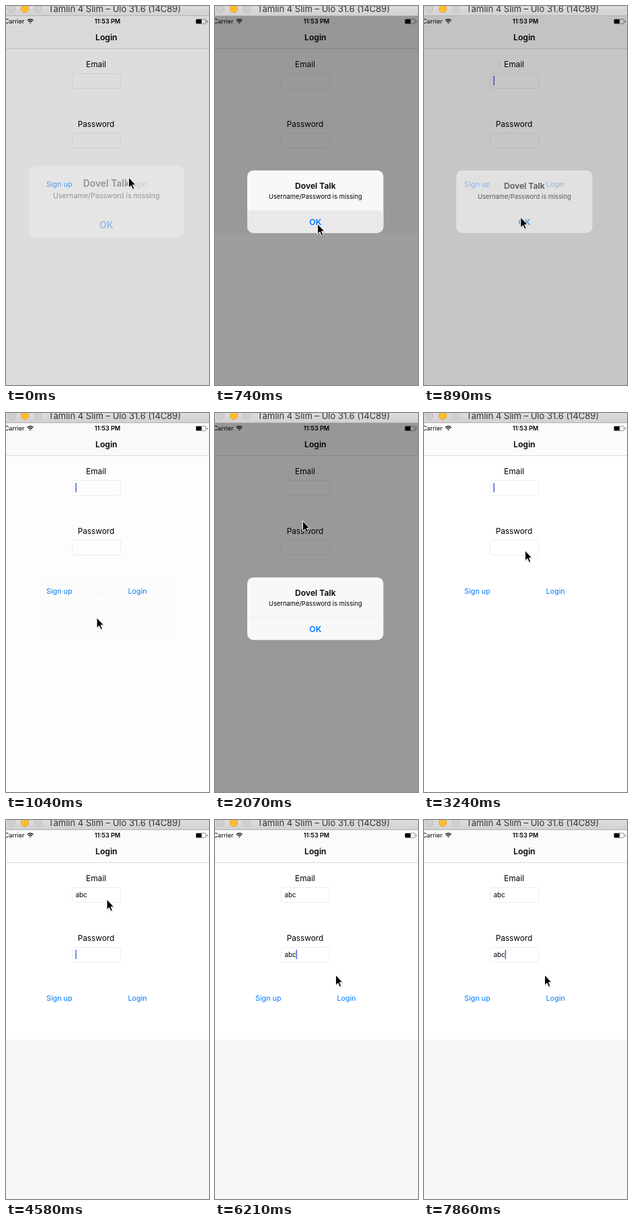
Recreate the animation shown at these times as an HTML page. Size 302 by 564 pixels, loop 8000 ms.

```html
<!DOCTYPE html>
<html lang="en">
<head>
<meta charset="utf-8">
<title>Login</title>
<style>
  html, body { margin: 0; width: 100%; height: 100%; overflow: hidden; background: #fff; }
  svg { display: block; width: 302px; height: 564px; font-family: Inter, Roboto, "Liberation Sans", sans-serif; }
  .mid { text-anchor: middle; }
  .bold { font-weight: 600; }
  .label { font-size: 11.8px; }
  .link { font-size: 10.8px; fill: #007aff; }
  .input { font-size: 9.9px; }
  .field { fill: none; stroke: #ededed; }
  .status { font-size: 9.1px; }
</style>
</head>
<body>
<svg viewBox="0 0 302 564">
  <defs>
    <linearGradient id="chrome" x2="0" y2="1">
      <stop offset="0" stop-color="#dedcde"/>
      <stop offset="1" stop-color="#d2d0d2"/>
    </linearGradient>
    <clipPath id="card"><rect x="48" y="244.7" width="202.5" height="93" rx="9"/></clipPath>
    <path id="arrow" d="M.5 0V15.4L4 12.2L6.4 17.8L8.9 16.7L6.5 11.2H11Z"/>
  </defs>

  <rect width="302" height="564" fill="#fff"/>
  <rect y="15" width="302" height="48" fill="#fbfbfb"/>
  <rect y="63" width="302" height="1" fill="#dcdcdc"/>

  <text class="status" x="-2.3" y="26">Carrier</text>
  <path d="M31.8 21.6Q36.2 17.6 40.6 21.6M33.5 23.5Q36.2 21 38.9 23.5" fill="none" stroke="#000" stroke-width="1.3"/>
  <path d="M35 25L36.2 24.2L37.4 25L36.2 26.2Z"/>
  <text class="status bold mid" x="151" y="26">11:53 PM</text>
  <rect x="282.5" y="19.5" width="15" height="7" rx="1.5" fill="none" stroke="#888" stroke-width=".8"/>
  <rect x="283" y="20" width="8" height="6" rx=".8"/>
  <rect x="298.8" y="21.5" width="1.2" height="3" rx=".6" fill="#777"/>

  <text class="bold mid" x="149.3" y="51" font-size="12.2">Login</text>
  <text class="label mid" x="134" y="91">Email</text>
  <rect class="field" x="98.5" y="100.5" width="72" height="22" rx="3"/>
  <text class="label mid" x="134" y="179.5">Password</text>
  <rect class="field" x="98.5" y="189.5" width="72" height="22" rx="3"/>
  <text class="input" id="email" x="103.5" y="115"></text>
  <text class="input" id="pass" x="103.5" y="204"></text>
  <rect id="caret" width="1.5" height="14" fill="#4468e0"/>
  <text class="link" x="60" y="269">Sign up</text>
  <text class="link" id="login" x="181.5" y="269">Login</text>

  <rect id="dim" y="15" width="302" height="549"/>
  <rect id="tint" y="338" width="302" height="226" fill="#fff"/>
  <rect id="footer" y="327" width="302" height="237" fill="#f7f7f7"/>

  <g id="alert">
    <g clip-path="url(#card)">
      <rect x="48" y="244" width="203" height="95" fill="#f8f8f8"/>
      <rect id="press" x="48" y="304" width="203" height="35" fill="#e9e9e9"/>
      <rect x="48" y="304" width="203" height="1" fill="#eee"/>
    </g>
    <text class="bold mid" x="149.3" y="271.5" font-size="12.2">Dovel Talk</text>
    <text class="mid" x="149.3" y="286.5" font-size="9.4">Username/Password is missing</text>
    <text class="bold mid" x="149.3" y="326" font-size="12.3" fill="#007aff">OK</text>
  </g>

  <rect width="302" height="14" fill="url(#chrome)"/>
  <rect y="14" width="302" height="1" fill="#b4b2b4"/>
  <g stroke-width=".8">
    <circle cx="8" cy="4" r="5.7" fill="#d0ced0" stroke="#bbb9bb"/>
    <circle cx="28" cy="4" r="5.7" fill="#fdbd2e" stroke="#dfa023"/>
    <circle cx="47.5" cy="4" r="5.7" fill="#d0ced0" stroke="#bbb9bb"/>
  </g>
  <text x="63" y="9" font-size="13" fill="#333">Tamlin 4 Slim – Ulo 31.6 (14C89)</text>

  <g id="mouse">
    <use href="#arrow" opacity=".18" transform="translate(.6 1.5)"/>
    <use href="#arrow" stroke="#fff"/>
  </g>
</svg>
<script>
const LOOP = 8000;
const TICK = 148;   // the screen refreshes once per tick; all times below are in ticks
const LEAD = 14;

const ALERTS = [
  { show: -1, tap: 4, hide: 5 },
  { show: 10, tap: 17, hide: 18.4 }
];
const MOVES = [
  { from: 0, to: 4, x: 152, y: 324 },        // to OK
  { from: 5, to: 7, x: 134.5, y: 304.5 },
  { from: 9, to: 11, x: 189, y: 266 },       // to Login
  { from: 11, to: 14, x: 130, y: 160.5 },
  { from: 14, to: 17, x: 149, y: 322 },      // to OK
  { from: 18, to: 19, x: 150, y: 251.5 },
  { from: 19, to: 24, x: 149.5, y: 118 },    // to the email field
  { from: 34, to: 42, x: 179, y: 230.5 }
];
const BLINKS = [26, 43, 44, 50];

const $ = id => document.getElementById(id);
const set = (id, attrs) => {
  for (const k in attrs) $(id).setAttribute(k, attrs[k]);
};
const clamp = (v, max) => Math.max(0, Math.min(max, v));
const ease = v => {
  const p = clamp(v, 1);
  return p * p * (3 - 2 * p);
};
// Letters typed so far, one per tick.
const keys = (n, start) => clamp(n - start + 1, 3);

function drawAlert(n) {
  const { show, tap, hide } = ALERTS[n < 10 ? 0 : 1];
  const grow = ease((n - show) / 2.6);
  const shown = grow * (1 - ease((n - hide) / 2.17));
  set('alert', {
    opacity: shown,
    transform: `translate(149.3 291) scale(${1.21 - .21 * grow}) translate(-149.3 -291)`
  });
  set('dim', { opacity: .4 * shown });
  set('press', { opacity: n >= tap && n <= hide ? 1 : 0 });
  set('login', { opacity: Math.max(.3, grow) });
  return n > show && n <= hide;
}

function drawInputs(n, blocked) {
  const erased = clamp(2 * (n - 44), 3);
  $('email').textContent = 'abc'.slice(0, keys(n, 27));
  $('pass').textContent = 'abc'.slice(0, keys(n, 40) - erased + keys(n, 51));

  const inEmail = n < 31;
  const box = $(inEmail ? 'email' : 'pass');
  const width = box.textContent ? box.getComputedTextLength() : 0;
  set('caret', {
    x: 103.3 + width,
    y: inEmail ? 104 : 193,
    opacity: blocked || BLINKS.includes(n) ? 0 : 1
  });
}

function drawMouse(n) {
  let x = 182, y = 255;
  for (const m of MOVES) {
    const p = ease((n - m.from) / (m.to - m.from));
    x += (m.x - x) * p;
    y += (m.y - y) * p;
  }
  set('mouse', { transform: `translate(${x} ${y})` });
}

function draw(t) {
  const n = Math.floor((t + LEAD) / TICK);
  drawInputs(n, drawAlert(n));
  drawMouse(n);
  set('tint', { opacity: n >= 2 && n <= 5 ? .05 : 0 });
  set('footer', { opacity: n >= 22 ? 1 : 0 });
}

const start = performance.now();
function loop() {
  draw((performance.now() - start) % LOOP);
  requestAnimationFrame(loop);
}
loop();
</script>
</body>
</html>
```
